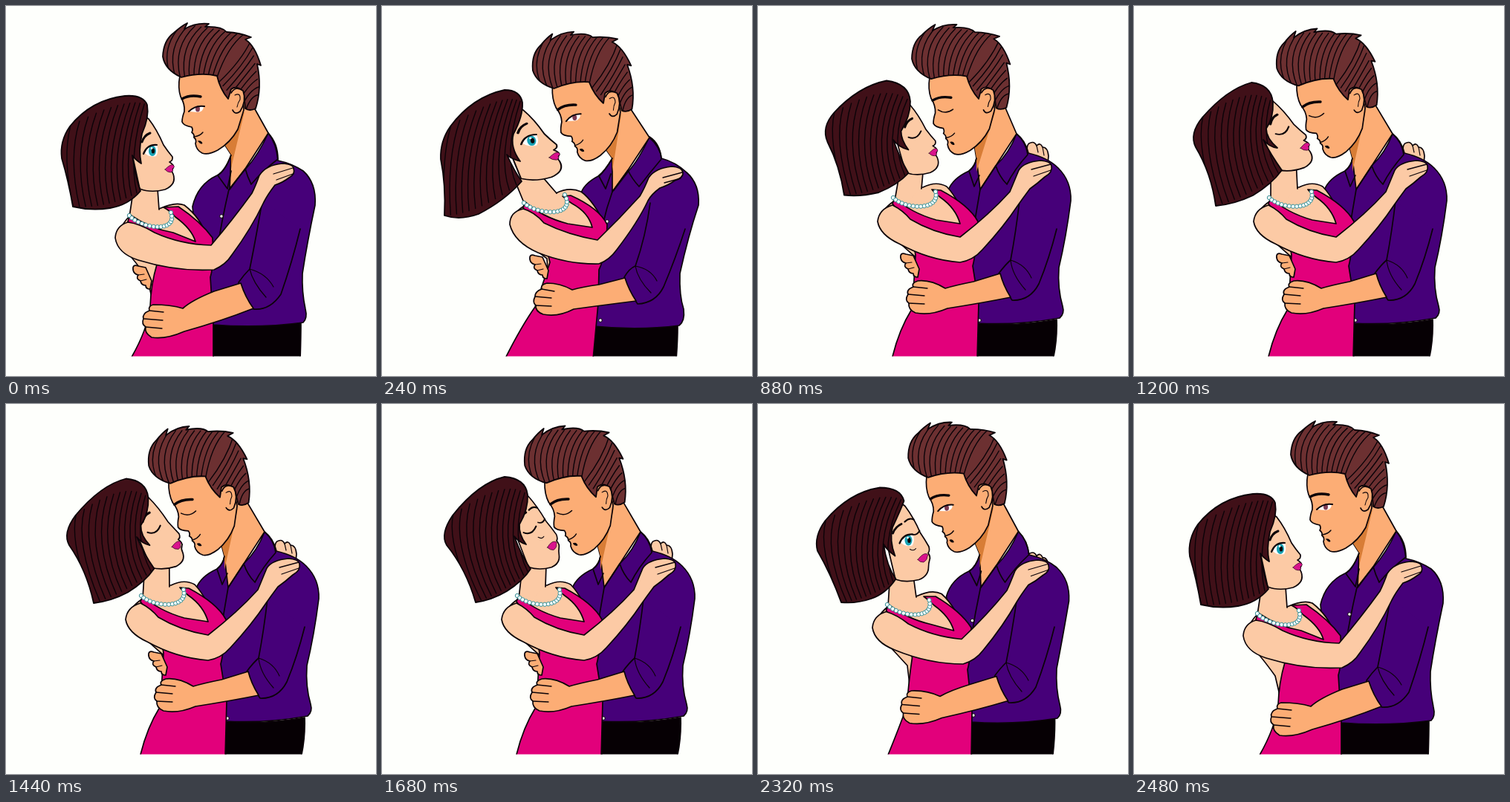
Animation, 498 px wide and 498 px high, one loop 2.56 s. Source, as an HTML page with a canvas:

```html
<!DOCTYPE html>
<html lang="en">
<head>
<meta charset="utf-8">
<title>Embrace</title>
<style>
html, body { margin: 0; width: 100%; height: 100%; overflow: hidden; background: #fefffc; }
canvas { display: block; }
</style>
</head>
<body>
<canvas id="stage" width="498" height="498"></canvas>
<script>
const ctx = document.getElementById('stage').getContext('2d');
const LOOP = 2560, STEP = 80;
const INK = '#0b0308', FAIR = '#fccaa5', TAN = '#fcad75', SHADE = '#d87d36', PINK = '#e2007b', VIOLET = '#460079';

// Body outlines in three poses: apart, leaning back, close.
const body = {
  pants: [
    'M277 427 L279 476 L396 476 Q397 445 397 424 Q340 434 277 427Z',
    'M284 431 L284 476 L396 476 Q398 450 398 430 Q345 436 289 431Z',
    'M294 427 L296 476 L397 476 Q403 450 402 422 Q345 432 296 427Z'],
  shirt: [
    'M303 200 Q295 222 284 228 Q258 240 251 270 L254 300 L262 380 L279 429 Q340 434 400 426 Q406 420 403 408 Q398 385 399 360 Q405 320 416 268 Q418 238 400 222 Q385 212 366 208 Q364 185 353 171 Q340 200 322 220 L305 240Z',
    'M310 205 Q300 222 291 229 Q270 240 267 255 L280 290 L285 350 L286 431 Q345 437 400 430 Q408 424 406 408 Q400 390 401 360 Q412 310 426 268 Q428 240 410 224 Q395 210 376 205 Q374 185 360 176 Q345 208 332 222 L312 248Z',
    'M294 205 Q292 216 284 222 Q262 232 256 248 L265 290 L280 340 L295 427 Q350 430 406 420 Q413 414 410 404 Q403 380 405 352 Q415 310 421 262 Q422 236 404 218 Q390 204 364 198 Q360 181 348 172 Q338 198 320 215 L300 245Z'],
  collar: [
    'M353 171 Q366 185 366 206 Q345 222 330 240 Q325 230 322 219 M303 201 Q295 222 285 228 L298 246 L303 222 M322 219 L300 247 Q290 290 284 330',
    'M360 177 Q375 190 376 206 Q360 225 346 243 Q336 232 331 221 M310 205 Q300 222 292 229 L301 246 L308 226 M331 221 L310 250 Q302 272 297 295',
    'M348 172 Q361 184 363 200 Q345 220 335 240 Q325 230 320 215 M294 205 Q292 216 284 222 L291 243 L298 228 M320 215 L299 247 Q295 270 290 300'],
  sleeve: [
    'M345 262 Q335 320 328 354 Q320 362 313 372 Q318 394 333 408 Q355 410 370 388 Q385 345 396 300',
    'M361 265 Q355 310 341 350 Q333 353 326 365 Q332 385 344 401 Q368 400 379 378 Q395 340 408 300',
    'M352 262 Q347 305 340 342 Q333 348 324 360 Q330 380 342 396 Q366 397 378 374 Q392 340 402 300'],
  cuff: [
    'M328 354 Q332 372 350 392 M328 354 Q350 360 360 378',
    'M341 350 Q344 368 362 386 M341 350 Q362 354 370 370',
    'M340 342 Q342 362 360 382 M340 342 Q360 348 368 366'],
  forearm: [
    'M316 373 L280 384 Q250 396 238 407 Q222 402 198 402 Q191 404 193 410 Q183 414 185 421 Q182 428 188 432 Q186 440 196 446 Q215 449 240 438 Q290 424 333 407 Q322 392 316 373Z',
    'M327 366 L292 375 Q270 378 256 382 Q240 373 222 373 Q213 375 215 381 Q206 384 206 391 Q202 399 207 403 Q206 411 217 415 Q237 419 258 408 Q302 402 342 397 Q332 382 327 366Z',
    'M326 360 L290 371 Q265 376 252 380 Q232 368 215 370 Q206 373 209 378 Q199 382 202 388 Q197 396 203 400 Q202 409 212 413 Q232 417 255 407 Q300 400 340 392 Q330 376 326 360Z'],
  knuckles: [
    'M193 410 L212 412 M186 421 L211 423 M188 432 L210 434',
    'M215 381 L232 384 M206 391 L228 393 M207 403 L228 404',
    'M209 378 L228 380 M202 388 L224 390 M203 400 L224 401'],
  torso: [
    'M166 283 Q150 300 150 318 Q168 335 190 366 L198 400 L262 330 L270 310 Q262 285 240 268 Q228 263 206 273 L190 270Z',
    'M190 270 Q174 280 174 296 Q192 318 222 340 L225 385 L290 320 L302 298 Q285 262 268 250 Q252 243 234 252 L212 246Z',
    'M184 262 Q164 275 163 292 Q182 312 212 338 L213 380 L275 320 L284 300 Q272 262 254 243 Q240 235 222 244 L207 244Z'],
  dress: [
    'M167 281 Q195 300 225 305 L255 317 Q250 300 228 284 Q220 275 212 271 L232 270 Q262 290 278 312 Q280 350 275 365 L279 428 L279 476 L167 476 Q190 437 194 405 Q195 375 203 348 L190 315 Q170 300 164 290Z',
    'M192 263 Q215 284 250 293 L283 298 Q278 278 256 266 Q248 261 243 256 L254 255 Q292 272 303 294 Q302 335 292 355 L291 400 L284 476 L165 476 Q187 432 206 405 Q216 375 226 345 L215 300 Q200 283 190 272Z',
    'M184 258 Q205 278 240 288 L272 293 Q266 272 246 258 Q238 252 234 247 L246 248 Q284 268 296 290 Q294 330 289 350 L297 400 L295 476 L180 476 Q189 437 207 408 Q210 375 212 335 L205 295 Q190 280 181 266Z'],
  arm: [
    'M164 291 Q148 296 147 312 Q150 333 178 342 Q230 358 280 355 Q296 348 304 335 Q330 300 347 264 Q352 254 362 241 Q372 238 381 231 Q390 226 387 219 Q387 213 372 212 Q350 214 341 228 Q336 242 331 252 Q305 288 276 322 Q235 321 200 305 Q180 293 164 291Z',
    'M190 273 Q172 277 172 294 Q178 318 210 332 Q250 348 292 347 Q306 342 316 328 Q345 290 358 262 Q362 254 374 245 Q386 241 394 235 Q406 231 405 224 Q404 217 390 216 Q368 218 359 231 Q353 246 347 256 Q320 286 290 315 Q250 308 218 292 Q205 277 190 273Z',
    'M181 268 Q163 273 161 290 Q164 308 190 320 Q230 342 272 345 Q290 342 302 328 Q330 298 350 268 Q357 258 366 246 Q376 239 386 230 Q397 224 395 215 Q394 209 380 208 Q358 210 351 221 Q344 238 339 250 Q312 280 272 311 Q235 305 205 287 Q195 275 181 268Z'],
  fingers: [
    'M360 226 L386 218 M364 234 L386 226',
    'M378 231 L404 224 M380 238 L402 232',
    'M368 220 L394 213 M371 229 L394 221']
};
// Loose points per pose.
const points = {
  manNeck: [[353, 171, 322, 219, 301, 247, 303, 200], [360, 177, 331, 221, 310, 250, 310, 205], [348, 172, 320, 215, 299, 247, 294, 205]],
  herNeck: [[166, 284, 206, 274], [192, 267, 235, 252], [184, 262, 220, 246]],
  pearls: [[166, 282, 182, 300, 232, 306, 222, 278], [191, 265, 210, 282, 262, 284, 246, 254], [182, 258, 198, 274, 246, 276, 239, 250]],
  buttons: [[290, 283, 282, 415], [303, 290, 294, 423], [287, 300, 298, 423]],
  farHands: [[0, 0, 0, 30], [28, -14, 8, 30], [21, -16, 0, -3]]
};

// man: ear position and tilt; face: brow, lips and jaw; hair: the bob's outline.
const apart = {
  pose: 0, man: [313, 126, 0], face: [192, 152, 226, 216, 182, 250], turn: 0,
  hair: 'M160 121 Q184 119 190 133 Q193 150 183 172 Q178 195 182 212 Q174 207 170 201 Q174 230 181 249 Q165 268 140 272 Q115 276 90 270 Q84 235 75 205 Q72 182 86 162 Q115 126 160 121Z'
};
const turned = {
  pose: 2, man: [303, 121, -8], face: [203, 129, 237, 193, 193, 227], turn: 1,
  hair: 'M168 104 Q200 106 203 128 Q190 138 179 160 Q175 172 187 197 Q172 185 168 176 Q172 205 190 222 Q180 242 165 252 Q150 262 134 264 Q112 222 85 190 Q78 174 95 152 Q130 112 168 104Z'
};
const keys = [
  { t: 0, ...apart },
  {
    t: 240, pose: 1, man: [312, 130, -8], face: [190, 140, 239, 199, 190, 236], turn: 0,
    hair: 'M165 113 Q186 113 189 130 Q190 148 177 172 Q172 190 186 209 Q172 205 168 200 Q178 222 188 236 Q165 262 130 280 Q105 289 84 282 Q86 240 79 206 Q78 182 92 162 Q122 122 165 113Z'
  },
  {
    t: 560, pose: 2, man: [320, 126, 5], face: [222, 138, 247, 202, 206, 232], turn: 0,
    hair: 'M188 98 Q222 103 223 127 Q222 148 207 172 Q207 183 212 196 Q196 190 190 180 Q198 210 206 229 Q190 242 165 247 Q140 247 122 240 Q116 205 104 176 Q96 155 112 138 Q145 104 188 98Z'
  },
  {
    t: 1200, pose: 2, man: [302, 125, -9], face: [187, 128, 236, 186, 196, 224], turn: 0,
    hair: 'M158 103 Q185 106 187 130 Q188 150 178 165 Q178 178 193 191 Q182 190 174 180 Q184 200 199 221 Q185 240 160 255 Q135 267 110 269 Q104 225 83 190 Q74 172 92 150 Q125 112 158 103Z'
  },
  {
    t: 1680, pose: 2, man: [302, 124, -9], face: [195, 125, 238, 188, 200, 222], turn: 0.5,
    hair: 'M165 98 Q193 100 196 122 Q197 142 185 162 Q184 176 194 189 Q184 186 178 178 Q188 205 200 222 Q190 238 168 252 Q148 264 126 267 Q113 222 87 190 Q78 175 95 150 Q130 106 165 98Z'
  },
  { t: 2080, ...turned },
  { t: 2240, ...turned },
  { t: 2400, ...apart },
  { t: LOOP, ...apart }
];

const lerp = (a, b, u) => a + (b - a) * u;
const mixList = (a, b, u) => a.map((v, i) => lerp(v, b[i], u));
function mixPath(a, b, u) {
  const ends = b.match(/\d+/g);
  let i = 0;
  return a.replace(/\d+/g, v => lerp(+v, +ends[i++], u).toFixed(2));
}
const basis = ([x, y, a, b, c, d]) => new DOMMatrix([a - x, b - y, c - x, d - y, x, y]);
const fit = (from, to) => basis(to).multiply(basis(from).inverse());
const at = (m, x, y) => { const p = m.transformPoint({ x, y }); return [p.x, p.y]; };
const bend = (a, b, c, u) => mixList(mixList(a, b, u), mixList(b, c, u), u);

function shape(d, fill, line = 1.7, ink = INK) {
  const path = new Path2D(d);
  if (fill) { ctx.fillStyle = fill; ctx.fill(path); }
  if (line) { ctx.strokeStyle = ink; ctx.lineWidth = line; ctx.stroke(path); }
}
function dot(x, y, rx, ry, fill, ink) {
  ctx.beginPath();
  ctx.ellipse(x, y, rx, ry, 0, 0, 7);
  ctx.fillStyle = fill;
  ctx.fill();
  if (ink) { ctx.strokeStyle = ink; ctx.lineWidth = 1; ctx.stroke(); }
}
function within(m, draw) {
  ctx.save();
  ctx.transform(m.a, m.b, m.c, m.d, m.e, m.f);
  draw();
  ctx.restore();
}
function hair(outline, fill, strands) {
  ctx.save();
  ctx.clip(new Path2D(outline));
  shape(outline, fill, 0);
  strands();
  ctx.restore();
  shape(outline, null, 1.8);
}
const strand = (a, b, c) => shape(`M${a} Q${b} ${c}`, null, 1.4);
const poly = list => 'M' + list.join(' ') + 'Z';

function manHead(closed) {
  shape('M234 94 Q231 110 235 122 Q241 132 240 142 Q237 150 237 156 Q239 161 250 163 Q252 167 250 170 Q254 173 253 177 Q257 180 255 185 Q256 194 264 198 Q272 201 285 194 Q302 184 312 166 L320 140 L318 100 L284 85Z', TAN);
  shape('M237 125 Q247 119 262 122', null, 3.4);
  if (closed) {
    shape('M244 138 Q254 145 264 138', null, 1.6);
  } else {
    shape('M247 142 Q256 132 266 135 Q266 142 258 143Z', '#fff', 0);
    dot(258, 138.5, 3, 4, '#7d3b52');
    shape('M246 142 Q255 133 267 135', null, 2);
  }
  shape('M253 176 Q261 175 265 170', null, 1.4);
  shape('M259 182 Q263 181 264 185 Q261 186 259 182Z', INK, 1);
  hair('M236 96 Q214 86 211 68 Q212 46 226 36 Q236 27 244 23 L240 31 Q256 22 273 24 L268 28 Q290 27 297 35 Q315 36 330 42 L322 45 Q335 53 343 80 L338 78 Q345 110 336 138 Q328 142 322 138 L320 116 Q311 106 303 112 L299 125 Q288 112 284 94 Q262 89 236 96Z', '#6c3031', () => {
    for (let u = 0; u <= 1; u += 0.1) strand([222 + 62 * u, 96], [206 + 92 * u, 55], [238 + 82 * u, 24 + 14 * u]);
    for (let u = 0; u <= 1; u += 0.14) strand([287 + 36 * u, 102 + 40 * u], [316 + 14 * u, 75 + 45 * u], [330 + 12 * u, 46 + 75 * u]);
  });
  shape('M303 117 Q309 107 319 114 Q324 128 315 142 Q308 147 305 140', TAN);
  shape('M308 120 Q316 116 315 126 Q312 130 311 136', null, 1.1);
}

function herFace(turn, closed) {
  const blend = (a, b) => mixPath(a, b, turn);
  shape(blend(
    'M186 148 L192 152 Q203 166 212 187 Q218 196 224 203 Q225 208 220 210 Q227 214 225 218 Q222 222 225 226 Q230 240 214 247 Q195 252 180 246 L170 200Z',
    'M186 140 L193 146 Q206 164 214 183 Q221 193 225 204 Q227 211 227 214 Q227 220 226 224 Q226 230 223 236 Q218 246 208 249 Q192 253 179 249 L164 190Z'), FAIR);
  shape(blend(
    'M214 220 Q222 212 225 214 Q228 217 224 219 Q226 222 222 224 Q217 224 214 220Z',
    'M205 222 Q210 213 216 212 Q222 211 221 214 Q220 220 213 225 Q208 226 205 222Z'), '#d9138c', 0.6);
  shape(blend('M183 183 Q186 174 194 171', 'M169 188 Q173 179 181 175'), null, 3);
  if (closed) {
    shape(blend('M187 197 Q198 202 205 189', 'M173 204 Q184 208 192 195'), null, 2);
  } else {
    shape('M187 198 Q191 186 203 187 Q206 196 202 202 Q193 204 187 198Z', '#fff', 0);
    dot(197, 195, 5, 7, '#18a3b5');
    dot(198, 195, 2.2, 3.6, INK);
    dot(196, 191.5, 1.4, 1.4, '#fff');
    shape('M185 199 Q190 186 203 187', null, 2.2);
  }
  if (turn > 0.3) {
    shape('M192 170 Q198 164 204 167', null, 2.2);
    shape('M202 187 Q208 189 212 182', null, 1.8);
    shape('M199 207 Q204 210 207 206', null, 1.1);
  }
}

function herHair(outline) {
  const n = outline.match(/[\d.]+/g).map(Number);
  const point = i => [n[2 * i], n[2 * i + 1]];
  const [crown, front, inner, right, hem, left, side, top] = [0, 2, 8, 10, 12, 14, 16, 18].map(point);
  hair(outline, '#401018', () => {
    for (let u = 0.06; u < 1; u += 0.085) {
      strand(bend(front, crown, top, u), mixList(inner, side, u), bend(right, hem, left, u));
    }
  });
}

function render(t) {
  let k = 0;
  while (t >= keys[k + 1].t) k++;
  const a = keys[k], b = keys[k + 1];
  const raw = (t - a.t) / (b.t - a.t), u = raw * raw * (3 - 2 * raw);
  const part = name => mixPath(body[name][a.pose], body[name][b.pose], u);
  const pts = name => mixList(points[name][a.pose], points[name][b.pose], u);
  const [earX, earY, tilt] = mixList(a.man, b.man, u);
  const man = new DOMMatrix().translate(earX, earY).rotate(tilt).translate(-apart.man[0], -apart.man[1]);
  const face = fit(apart.face, mixList(a.face, b.face, u));
  const closed = t >= 720 && t < 2280;
  const sway = t > 240 && t < 560 ? 12 * Math.sin(Math.PI * (t - 240) / 320) : 0;

  ctx.fillStyle = '#fefffc';
  ctx.fillRect(0, 0, 498, 498);
  ctx.save();
  ctx.beginPath();
  ctx.rect(0, 0, 498, 471.5);
  ctx.clip();
  ctx.translate(sway, 0);
  ctx.lineCap = ctx.lineJoin = 'round';

  const [hx, hy, fx, fy] = pts('farHands');
  within(new DOMMatrix([1, 0, 0, 1, fx, fy]), () => {
    shape('M362 200 Q361 188 367 187 Q372 185 375 191 Q380 186 383 193 Q390 193 391 205 L390 215 L364 210Z', FAIR);
    shape('M375 191 L377 200 M383 193 L385 204', null, 1.2);
  });

  shape(part('pants'), '#060004');
  shape(part('shirt'), VIOLET);
  const n = pts('manNeck');
  const nape = at(man, 334, 137), jaw = at(man, 290, 180);
  shape(poly([...nape, ...n, ...jaw, ...at(man, 314, 125)]), TAN);
  shape(poly([...at(man, 321, 142), n[6], n[7] + 18, n[6], n[7], ...jaw]), SHADE, 0);
  shape(part('collar'));
  const btn = pts('buttons');
  dot(btn[0], btn[1], 2.3, 2.3, '#fff', INK);
  dot(btn[2], btn[3], 2.3, 2.3, '#fff', INK);
  within(man, () => manHead(closed));

  shape(part('torso'), FAIR);
  const w = pts('herNeck'), back = at(face, 172, 244), front = at(face, 204, 246);
  shape(poly([...back, w[0], w[1], (w[0] + w[2]) / 2, (w[1] + w[3]) / 2 + 9, w[2], w[3], ...front]), FAIR, 0);
  shape(`M${back} L${w[0]} ${w[1]} M${front} L${w[2]} ${w[3]}`);
  shape(part('dress'), PINK);
  if (t < 2320) within(new DOMMatrix([1, 0, 0, 1, hx, hy]), () => {
    shape('M178 350 Q170 347 171 355 Q172 361 178 362 Q174 367 181 370 Q182 376 188 376 Q188 381 194 381 L196 370 L188 352Z', TAN);
    shape('M178 362 L186 361 M181 370 L189 368', null, 1.2);
  });
  within(face, () => herFace(lerp(a.turn, b.turn, u), closed));
  herHair(mixPath(a.hair, b.hair, u));

  const p = pts('pearls');
  for (let i = 0; i < 17; i++) {
    const s = i / 16, r = 1 - s, c = [r * r * r, 3 * r * r * s, 3 * r * s * s, s * s * s];
    const along = o => c.reduce((sum, v, j) => sum + v * p[2 * j + o], 0);
    dot(along(0), along(1), 2.7, 2.7, '#f4ffff', '#3d8f94');
  }

  shape(part('sleeve'), VIOLET);
  shape(part('cuff'), null, 1.2);
  shape(part('forearm'), TAN);
  shape(part('knuckles'), null, 1.3);
  shape(part('arm'), FAIR);
  shape(part('fingers'), null, 1.3);
  ctx.restore();
}

const start = performance.now();
function tick() {
  const t = (performance.now() - start) % LOOP;
  render(Math.floor(t / STEP) * STEP);
  requestAnimationFrame(tick);
}
tick();
</script>
</body>
</html>
```
